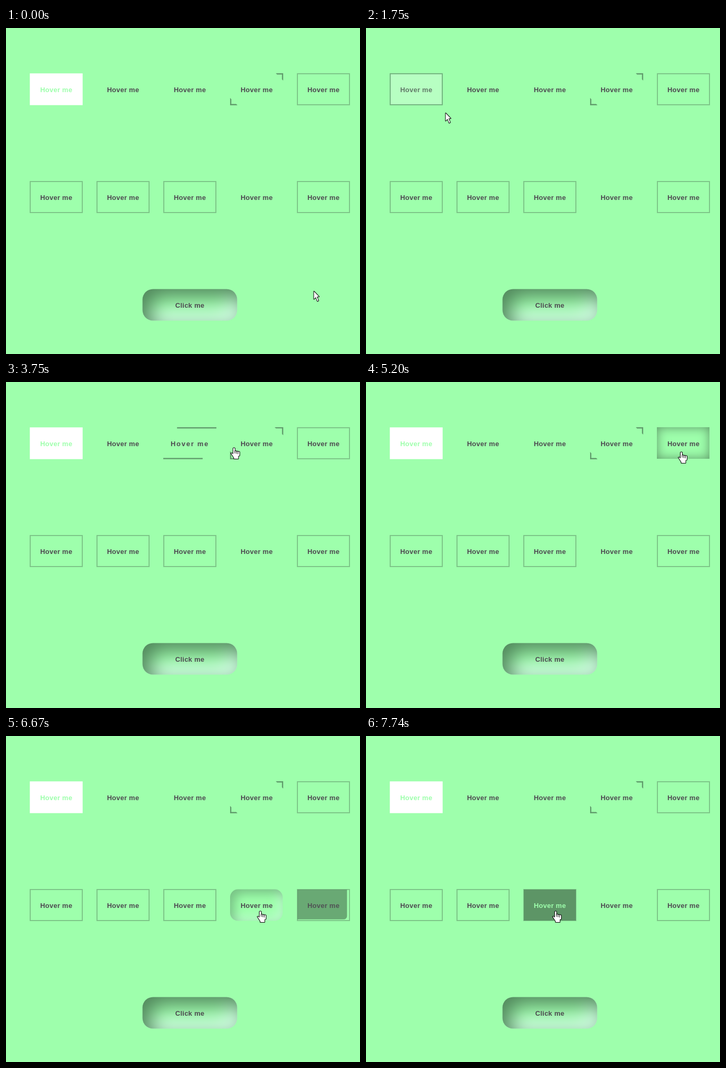
Animation, 673 px wide and 620 px high, one loop 8 s. Source, as an HTML page with a canvas:

```html
<!DOCTYPE html>
<html lang="en">
<head>
<meta charset="utf-8">
<title>Button hover effects</title>
<style>
html, body { margin: 0; width: 100%; height: 100%; overflow: hidden; background: #9effac; }
canvas { display: block; }
</style>
</head>
<body>
<canvas id="stage" width="673" height="620"></canvas>
<script>
const ctx = document.getElementById('stage').getContext('2d');
const LOOP = 8000, FADE = 500;
const W = 100, H = 60, TOP = 86, LOW = 291, LEFT = 45, STEP = 127;
const BG = [158, 255, 172], INK = [77, 74, 80], LINE = [97, 156, 108];
const BORDER = [125, 198, 136], FILL = [93, 149, 102], WHITE = [255, 255, 255];

const rgb = (c, a = 1) => `rgba(${c.map(Math.round).join()},${a})`;
const lerp = (a, b, k) => a + (b - a) * k;
const mix = (a, b, k) => a.map((v, i) => lerp(v, b[i], k));
const clamp = v => Math.min(1, Math.max(0, v));
const smooth = k => k * k * (3 - 2 * k);
const column = i => LEFT + STEP * i;

// cubic-bezier(.25, .1, .25, 1)
function ease(x) {
  const curve = (s, a, b) => 3 * s * (1 - s) ** 2 * a + 3 * s * s * (1 - s) * b + s ** 3;
  let lo = 0, hi = 1;
  for (let i = 0; i < 20; i++) {
    const mid = (lo + hi) / 2;
    if (curve(mid, .25, .25) < x) lo = mid; else hi = mid;
  }
  return curve(lo, .1, 1);
}

// Resting points of the pointer, one per visited button after the first
const stop = (x, y, start, time, sag = 0) => ({ x, y, start, time, sag });
const stops = [
  stop(585, 500, 0, 1),
  stop(117, 142, 70, 705, -92),
  stop(225, 128, 1590, 430, 28),
  stop(352, 124, 2510, 500),
  stop(478, 126, 3440, 520),
  stop(599, 133, 4360, 200),
  stop(603, 333, 5195, 310),
  stop(483, 333, 6360, 270),
  stop(360, 333, 7200, 140)
];

const legAt = t => stops.findLastIndex(s => s.start <= t);

function pointer(t) {
  const i = legAt(t), to = stops[i], from = stops[i - 1] || to;
  const k = smooth(clamp((t - to.start) / to.time));
  return [lerp(from.x, to.x, k), lerp(from.y, to.y, k) + to.sag * Math.sin(Math.PI * k)];
}

function over(t, s) {
  const [x, y] = pointer(t);
  const left = column(Math.floor((s.x - LEFT) / STEP)), top = s.y < LOW ? TOP : LOW;
  return x >= left && x <= left + W + 1 && y >= top && y <= top + H + 1;
}

// A hover begins and ends where the pointer crosses the button's edge
const visits = stops.slice(1).map(s => {
  let enter = s.start, leave;
  while (!over(enter, s)) enter++;
  for (leave = enter; leave < LOOP && over(leave, s);) leave++;
  return { enter, leave };
});

const hover = (t, v) => ease(clamp((t - v.enter) / FADE)) - ease(clamp((t - v.leave) / FADE));

function label(text, cx, y, color = INK, gap = 0) {
  ctx.font = 'bold 13px "Liberation Sans", Arial, sans-serif';
  ctx.letterSpacing = gap + .25 + 'px';
  ctx.fillStyle = rgb(color);
  ctx.fillText(text, cx - ctx.measureText(text).width / 2, y);
}

const hoverLabel = (x, y, color, gap) => label('Hover me', x + 50.5, y + 36, color, gap);

function border(x, y, color = BORDER, alpha = 1) {
  ctx.strokeStyle = rgb(color, alpha);
  ctx.lineWidth = 2;
  ctx.strokeRect(x + 1, y + 1, W - 1, H - 1);
}

function inset(x, y, w, h, r, offset, blur, color) {
  const far = 2000;
  ctx.save();
  ctx.beginPath();
  ctx.roundRect(x, y, w, h, r);
  ctx.clip();
  ctx.shadowColor = color;
  ctx.shadowBlur = blur;
  ctx.shadowOffsetX = far + offset;
  ctx.shadowOffsetY = offset;
  ctx.fillStyle = '#000';
  ctx.beginPath();
  ctx.rect(x - far - 150, y - 150, w + 300, h + 300);
  ctx.roundRect(x - far, y, w, h, r);
  ctx.fill('evenodd');
  ctx.restore();
}

function soft(x, y, w, p) {
  if (p < .005) return;
  const r = 10 + 10 * p;
  inset(x, y, w, H, r, -15 * p, 36 * p, rgb([217, 255, 236], p));
  inset(x, y, w, H, r, 15 * p, 36 * p, rgb([80, 136, 91], p));
}

function polygon(points) {
  ctx.beginPath();
  points.forEach(([x, y]) => ctx.lineTo(x, y));
  ctx.closePath();
}

// Two joined edges with mitred ends; s = 1 top right, -1 bottom left
function corner(x, y, w, h, s) {
  const d = 2.4;
  const shape = [[0, 0], [-w, 0], [d - w, d], [-d, d], [-d, h - d], [0, h]];
  polygon(shape.map(([a, b]) => [x + a * s, y + b * s]));
  ctx.fillStyle = rgb(LINE);
  ctx.fill();
}

function fadeButton(x, p) {
  ctx.fillStyle = rgb(WHITE, 1 - p);
  ctx.fillRect(x + .3, TOP + .3, W + .4, H + .4);
  border(x, TOP, LINE, p);
  hoverLabel(x, TOP, mix(BG, INK, p));
}

function lineButton(x, p, align) {
  const len = (W + 1) * p, room = W + 1 - len;
  ctx.fillStyle = rgb(LINE);
  ctx.fillRect(x + room * align, TOP, len, 2.4);
  ctx.fillRect(x + room * (1 - align), TOP + 58.4, len, 2.4);
  hoverLabel(x, TOP, INK, 2 * p);
}

function cornerButton(x, p) {
  const out = 5 * p, w = lerp(14, W + 11, p), h = lerp(14, H + 11, p);
  corner(x + W + 1 + out, TOP - out, w, h, 1);
  corner(x - out, TOP + H + 1 + out, w, h, -1);
  hoverLabel(x, TOP);
}

function shadowButton(x, p) {
  border(x, TOP, BORDER, 1 - p);
  if (p > .005) inset(x, TOP, W, H, 0, 0, 20 * p, rgb([64, 104, 72], .7 * p));
  hoverLabel(x, TOP);
}

function softButton(x, p) {
  soft(x, LOW + .5, W, p);
  hoverLabel(x, LOW);
}

function solidButton(x, p) {
  border(x, LOW);
  ctx.fillStyle = rgb(FILL, p);
  ctx.fillRect(x + 1, LOW + 1, W - 1, H - 1);
  hoverLabel(x, LOW, mix(INK, BG, p));
}

function sweepButton(x, p) {
  border(x, LOW);
  const size = clamp(2.8 * p);
  ctx.fillStyle = rgb(FILL, clamp(.7 + .3 * p));
  ctx.beginPath();
  ctx.roundRect(x + 1, LOW + 1, (W - 2) * size, (H - 1) * size, [0, 0, 10 * (1 - p), 0]);
  ctx.fill();
  hoverLabel(x, LOW, mix(INK, BG, clamp(p) ** 3));
}

function outlined(draw) {
  ctx.lineJoin = 'round';
  ctx.lineWidth = 2;
  ctx.strokeStyle = '#000';
  ctx.fillStyle = '#fff';
  draw();
  ctx.stroke();
  ctx.fill();
}

function arrow() {
  outlined(() => polygon([[.5, 1], [.5, 15.5], [4, 12], [7, 19.5], [9, 18.5], [6, 11], [10, 11]]));
}

function hand() {
  const knuckle = i => i ? 5 + i * .7 : 0;
  outlined(() => {
    ctx.beginPath();
    for (let i = 0; i < 4; i++) ctx.roundRect(3 * i - 1, knuckle(i) + .5, 3, 15 - knuckle(i), 1);
    ctx.roundRect(-1, 9, 12, 7, [0, 0, 3, 3]);
    ctx.rect(.5, 14, 8, 7);
    ctx.moveTo(-5, 10.5);
    ctx.lineTo(-3, 10.5);
    ctx.lineTo(1, 14);
    ctx.lineTo(1, 20);
    ctx.closePath();
  });
  ctx.fillStyle = '#000';
  for (let i = 1; i < 4; i++) ctx.fillRect(3 * i - 1.5, knuckle(i), 1, 5);
}

function cursor(t) {
  const [x, y] = pointer(t).map(Math.round), i = legAt(t);
  ctx.save();
  ctx.translate(x, y);
  if (over(t, stops[i]) && i || i > 1 && over(t, stops[i - 1])) hand(); else arrow();
  ctx.restore();
}

function draw(t) {
  const [fade, middle, line, angle, shade, sweep, bump, solid] = visits.map(v => hover(t, v));
  ctx.fillStyle = rgb(BG);
  ctx.fillRect(0, 0, 673, 620);

  fadeButton(column(0), fade);
  lineButton(column(1), middle, .5);
  lineButton(column(2), line, 1);
  cornerButton(column(3), angle);
  shadowButton(column(4), shade);

  for (let i = 0; i < 2; i++) {
    border(column(i), LOW);
    hoverLabel(column(i), LOW);
  }
  solidButton(column(2), solid);
  softButton(column(3), bump);
  sweepButton(column(4), sweep);

  soft(259.5, 496.5, 180, 1);
  label('Click me', 349.5, 532);
  cursor(t);
}

const start = performance.now();
function tick() {
  draw((performance.now() - start) % LOOP);
  requestAnimationFrame(tick);
}
tick();
</script>
</body>
</html>
```
